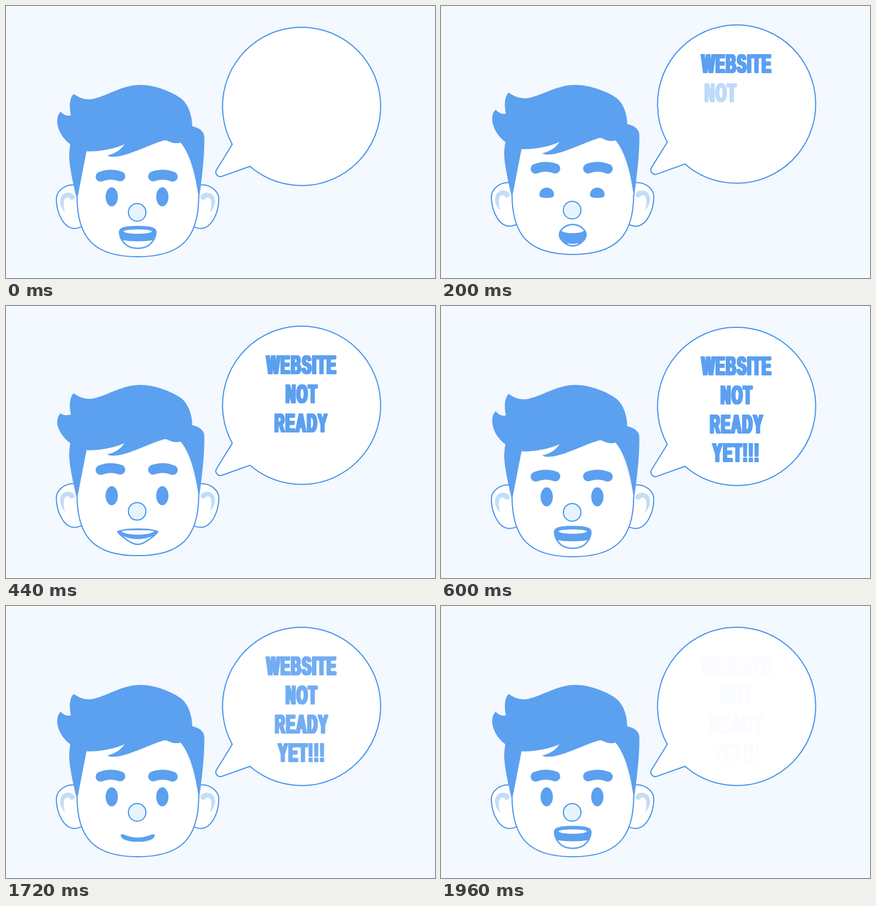
Recreate the animation shown at these times as an HTML page with a canvas. Size 767 px wide and 486 px high, loop 2 s.

```html
<!DOCTYPE html>
<html lang="en">
<head>
<meta charset="utf-8">
<title>Website not ready yet</title>
<style>
  html, body { margin: 0; width: 100%; height: 100%; overflow: hidden; background: #f4f8ff; }
  canvas { display: block; width: 767px; height: 486px; }
</style>
</head>
<body>
<canvas id="stage" width="767" height="486"></canvas>
<script>
const ctx = document.getElementById('stage').getContext('2d');
const LOOP = 2000, STEP = 40;
const BLUE = '#5ca0f0', LINE = '#4694ec', PALE = '#c3ddf8', NOSE = '#e7f4fe';
const AXIS = 235.5;

const clamp = (v, lo = 0, hi = 1) => Math.min(hi, Math.max(lo, v));
const mix = (a, b, p) => a + (b - a) * p;
const smooth = p => p * p * (3 - 2 * p);

// Each track is a list of [time, value] pairs.
function track(keys, t, blend = mix) {
  let i = 0;
  while (i < keys.length - 2 && t > keys[i + 1][0]) i++;
  const [[t0, a], [t1, b]] = [keys[i], keys[i + 1]];
  return blend(a, b, smooth(clamp((t - t0) / (t1 - t0))));
}

const EYES = [[0, 0], [120, .73], [200, 1], [320, 1], [440, 0]];
const BROWS = [[0, 0], [120, -9], [200, -10], [440, -10], [600, 0]];
const TUFT = [[0, 0], [120, 0], [320, -2.5], [440, 4], [600, -1], [840, 0]];

// w/my: corners, ty/by: top and bottom, ht/hb/su/sd: curve handles,
// tw..tb: teeth lens, gw..gd: tongue edge.
const mouth = (w, my, ty, by, ht, hb, su, sd, tw, tc, tt, tb, gw, gy, gd) =>
  ({ w, my, ty, by, ht, hb, su, sd, tw, tc, tt, tb, gw, gy, gd });
const OPEN = mouth(32.5, 404, 394, 433, 26, 26, 6, 8, 25.5, 402.5, 398, 408.5, 30, 418, 423);
const ROUND = mouth(20, 413, 393, 433, 11, 11, 11, 11, 20, 403, 388, 412, 0, 434, 434);
const OVAL = mouth(31, 412, 397, 432, 15, 15, 4, 4, 24, 405, 399, 412, 27, 417, 423);
const GRIN = mouth(35.5, 405, 400.5, 428, 22, 14, 1, 2, 30, 403, 402.5, 413, 27, 413, 424);
const SMILE = mouth(29, 410, 415, 420, 18, 22, 4, 4, 0, 416, 416, 416, 0, 419, 419);
const MOUTHS = [[0, OPEN], [120, ROUND], [320, OVAL], [440, GRIN], [580, OPEN],
  [680, OPEN], [840, SMILE], [1740, SMILE], [1960, OPEN]];

function mixMouth(a, b, p) {
  const m = {};
  for (const k in a) m[k] = mix(a[k], b[k], p);
  return m;
}

const EAR = new Path2D('M128,319.5 L121,319.5 C105,319 89,331 90,347 C91,372 104,397 122,397.5 C128,397.5 131,396 138,393.5');
const EAR_FOLD = new Path2D('M106,369.5 C97,361 93,346 101,337.5 C108,331 120,333 123,341 C122,347 116,348 113,343 C109,340 104,344 103.5,350 C103,358 104,364 106,369.5 Z');
const JAW = 'M127,340 C127,415 158,448 235.5,448 C313,448 344.5,415 344.5,340';
const FACE = new Path2D(JAW + ' L312,225 L144,225 Z');
const JAW_LINE = new Path2D(JAW);
const BROW = new Path2D('M169,305 Q187,298 204.5,304.5');
const HAIR = `M127,347 C120,318 113,285 113,268 C113,260 114,253 115,247
  C100,236 92,220 91.5,207 C91.5,198 94,192 98,189 C103,195 109,197 116,195.5
  C113,180 113,165 121,157 C129,163 141,169 156,166 C185,159 208,141 240,141
  C268,141 300,155 314,166 C327,177 333,198 333,215 C345,217 354,224 354.5,233
  C355.5,265 350,310 345,347 C340,305 330,265 312,244 C305,246.5 296,245 289,241
  C284,239 282,240 277,242 C250,250 215,270 190,269.5 C186,269.5 183,268.5 181,267
  C195,264 205,257 212,247 C195,255 165,261 144,259.5 Z`;

function outline(path, fill) {
  ctx.fillStyle = fill;
  ctx.strokeStyle = LINE;
  ctx.lineWidth = 2;
  ctx.fill(path);
  ctx.stroke(path);
}

function mirrored(draw) {
  draw();
  ctx.save();
  ctx.translate(2 * AXIS - .5, 0);
  ctx.scale(-1, 1);
  draw();
  ctx.restore();
}

function drawBubble() {
  const p = new Path2D(), x = 528.5, y = 179.3;
  p.arc(x, y, 141.4, Math.atan2(68, -124), Math.atan2(107.5, -92.5) + 2 * Math.PI);
  p.arcTo(364.5, 312, 404.5, 247, 8);
  p.closePath();
  outline(p, '#fff');
}

const WORDS = ['WEBSITE', 'NOT', 'READY', 'YET!!!'];

function drawWords(t) {
  const fade = clamp((1969 - t) / 290);
  ctx.font = 'bold 46px "Liberation Sans", Arial, sans-serif';
  ctx.textAlign = 'center';
  ctx.letterSpacing = '4px';
  ctx.lineJoin = 'round';
  ctx.lineWidth = 2;
  WORDS.forEach((word, i) => {
    const p = clamp((t - (i ? 155 + 160 * (i - 1) : 5)) / 160);
    const alpha = Math.min(1, p * 1.4) * fade;
    if (alpha <= 0) return;
    const [r, g, b] = [92, 160, 240].map(c => Math.round(mix(255, c, alpha)));
    ctx.fillStyle = ctx.strokeStyle = `rgb(${r},${g},${b})`;
    ctx.save();
    ctx.translate(529 - 77 * (1 - p) ** 3, 123 + 51.8 * i);
    ctx.scale(.53, 1);
    // Repeated passes thicken the upright stems.
    for (let dx = -3; dx <= 3; dx += 1.5) {
      ctx.fillText(word, dx, 0);
      ctx.strokeText(word, dx, 0);
    }
    ctx.restore();
  });
}

function drawHair(bob, swing) {
  const d = HAIR.replace(/([\d.]+),([\d.]+)/g, (_, x, y) => {
    let weight = clamp((y - 141) / 70);
    if (x < 145) weight = Math.max(weight, .6);
    const extra = x < 110 && y < 215 ? swing * clamp((110 - x) / 12) : 0;
    return `${x},${+y + bob * weight + extra}`;
  });
  ctx.fillStyle = BLUE;
  ctx.fill(new Path2D(d));
}

function drawEye(x, squint) {
  const rx = 11 + 2 * squint, top = mix(324, 328.5, squint);
  const mid = mix(341, 340.5, squint), low = mix(358, 347, squint);
  const k = .55, kb = mix(k, .92, squint);
  ctx.beginPath();
  ctx.moveTo(x, top);
  for (const s of [1, -1]) {
    const a = s > 0 ? [top, mid, low, k, kb] : [low, mid, top, kb, k];
    ctx.bezierCurveTo(x + s * rx * a[3], a[0], x + s * rx, mix(mid, a[0], k), x + s * rx, mid);
    ctx.bezierCurveTo(x + s * rx, mix(mid, a[2], k), x + s * rx * a[4], a[2], x, a[2]);
  }
  ctx.fill();
}

function drawMouth(m) {
  const x = AXIS, l = x - m.w, r = x + m.w;
  const lips = new Path2D();
  lips.moveTo(l, m.my);
  lips.bezierCurveTo(l, m.my - m.su, x - m.ht, m.ty, x, m.ty);
  lips.bezierCurveTo(x + m.ht, m.ty, r, m.my - m.su, r, m.my);
  lips.bezierCurveTo(r, m.my + m.sd, x + m.hb, m.by, x, m.by);
  lips.bezierCurveTo(x - m.hb, m.by, l, m.my + m.sd, l, m.my);
  lips.closePath();

  ctx.fillStyle = ctx.strokeStyle = m === ROUND ? LINE : BLUE;
  ctx.fill(lips);
  ctx.save();
  ctx.clip(lips);
  ctx.fillStyle = '#fff';
  const h = m.tw * .9;
  ctx.beginPath();
  ctx.moveTo(x - m.tw, m.tc);
  ctx.bezierCurveTo(x - h, m.tt, x + h, m.tt, x + m.tw, m.tc);
  ctx.bezierCurveTo(x + h, m.tb, x - h, m.tb, x - m.tw, m.tc);
  ctx.fill();
  ctx.beginPath();
  ctx.moveTo(x - m.gw, m.gy);
  ctx.quadraticCurveTo(x, m.gd, x + m.gw, m.gy);
  ctx.lineTo(x + m.gw, 440);
  ctx.lineTo(x - m.gw, 440);
  ctx.fill();
  ctx.restore();
  ctx.lineWidth = 2.6;
  ctx.lineJoin = 'round';
  ctx.stroke(lips);
}

function drawFace(t) {
  mirrored(() => {
    outline(EAR, '#fff');
    ctx.fillStyle = PALE;
    ctx.fill(EAR_FOLD);
  });
  ctx.fillStyle = '#fff';
  ctx.fill(FACE);
  ctx.strokeStyle = LINE;
  ctx.lineWidth = 2;
  ctx.stroke(JAW_LINE);

  ctx.fillStyle = BLUE;
  const squint = track(EYES, t);
  drawEye(189, squint);
  drawEye(279.5, squint);

  const nose = new Path2D();
  nose.arc(234.5, 368.8, 15.7, 0, 2 * Math.PI);
  outline(nose, NOSE);
  drawMouth(track(MOUTHS, t, mixMouth));
}

function drawBrows(lift) {
  ctx.save();
  ctx.translate(0, lift);
  ctx.strokeStyle = BLUE;
  ctx.lineWidth = 17.5;
  ctx.lineCap = 'round';
  ctx.stroke(BROW);
  ctx.translate(467.3, 0);
  ctx.scale(-1, 1);
  ctx.stroke(BROW);
  ctx.restore();
}

function draw(t) {
  const bob = t < 560 ? -5 * Math.sin(Math.PI * t / 560) ** 2 : 0;
  ctx.fillStyle = '#f4f8ff';
  ctx.fillRect(0, 0, 767, 486);
  ctx.save();
  ctx.translate(0, bob);
  drawBubble();
  drawWords(t);
  drawFace(t);
  ctx.restore();
  drawHair(bob, track(TUFT, t));
  drawBrows(bob + track(BROWS, t));
}

const start = performance.now();
function tick() {
  const t = Math.max(0, performance.now() - start) % LOOP;
  draw(Math.floor(t / STEP) * STEP);
  requestAnimationFrame(tick);
}
tick();
</script>
</body>
</html>
```
